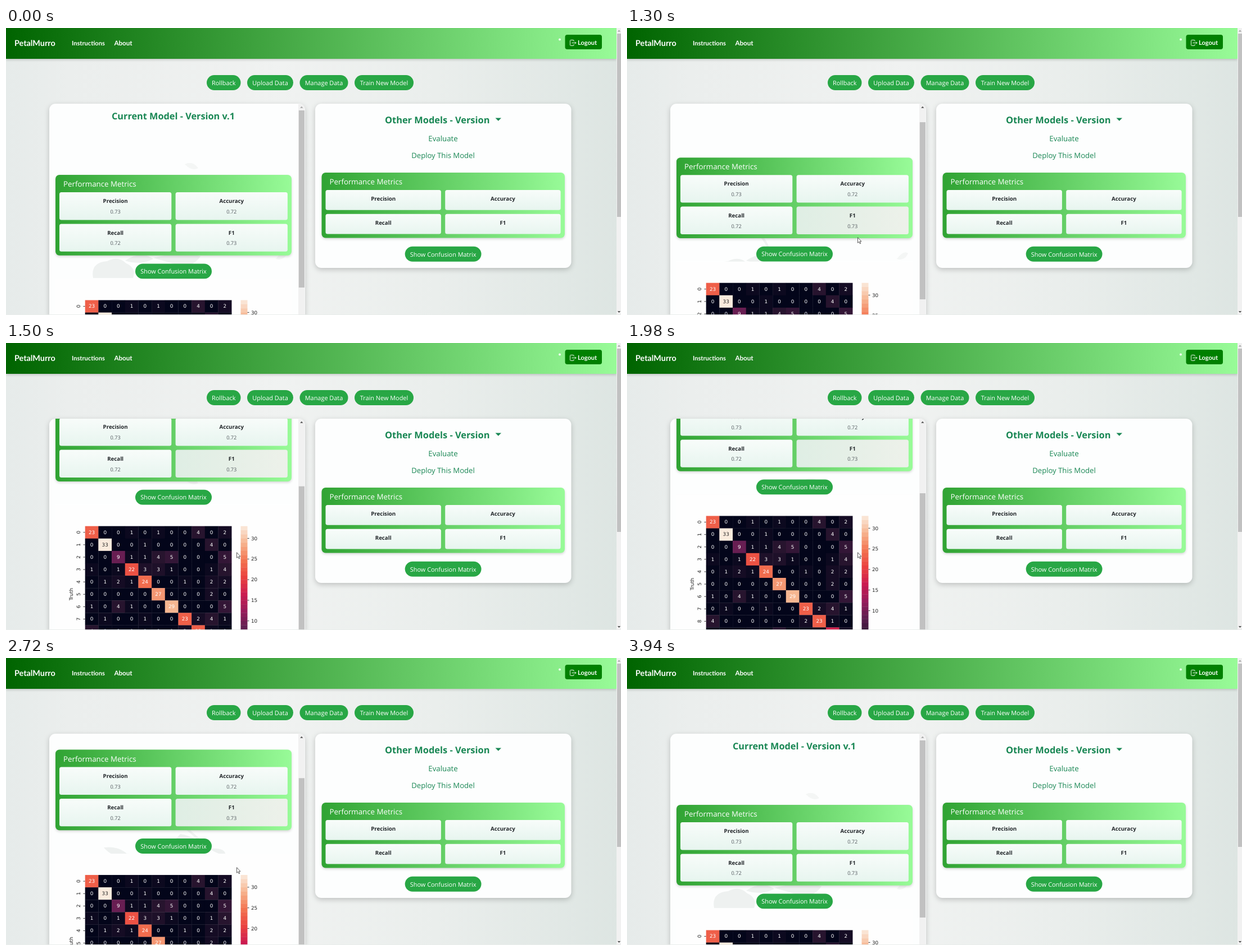
An HTML page for the animation above (4.94 s loop, 1094 px wide and 512 px high).

```html
<!DOCTYPE html>
<html lang="en">
<head>
<meta charset="utf-8">
<title>Model dashboard</title>
<style>
html, body { margin: 0; width: 100%; height: 100%; overflow: hidden; }
svg { display: block; width: 1094px; height: 512px; font-family: "Open Sans", "Noto Sans", sans-serif; text-rendering: geometricPrecision; }
.nav { font-family: Lato, sans-serif; font-weight: 700; fill: #fff; }
.plot { font-family: "DejaVu Sans", sans-serif; font-size: 8.8px; }
.card { filter: drop-shadow(0 3px 5px rgba(0,0,0,.2)); }
.panel { filter: drop-shadow(0 2px 2px rgba(0,0,0,.16)); }
</style>
</head>
<body>
<svg id="stage" viewBox="0 0 1094 512"></svg>
<script>
const LOOP = 4940, GREEN = '#198754';
const range = n => [...Array(n).keys()];

const rect = (x, y, w, h, fill, r = 0, extra = '') =>
  `<rect x="${x}" y="${y}" width="${w}" height="${h}" rx="${r}" fill="${fill}" ${extra}/>`;
const text = (s, x, y, size, fill, extra = 'text-anchor="middle"') =>
  `<text x="${x}" y="${y}" font-size="${size}" fill="${fill}" ${extra}>${s}</text>`;
const path = (d, fill, extra = '') => `<path d="${d}" fill="${fill}" ${extra}/>`;
const grad = (id, stops, dir = '') => `<linearGradient id="${id}" ${dir}>` +
  stops.map(([o, c]) => `<stop offset="${o}" stop-color="${c}"/>`).join('') + '</linearGradient>';
const down = 'x1="0" y1="0" x2="0" y2="1"';

const pill = (s, x, y, w) =>
  rect(x, y, w, 27, '#28a745', 13.5) + text(s, x + w / 2, y + 17.8, 10.9, '#fff');

function panel(x, y, w, cellW, cellH, values) {
  let out = rect(x, y, w, 45 + 2 * cellH, 'url(#panel)', 7, 'class="panel"') +
    text('Performance Metrics', x + 14, y + 21, 13.3, '#fff', '');
  ['Precision', 'Accuracy', 'Recall', 'F1'].forEach((name, i) => {
    const cx = x + 7 + (i % 2) * (cellW + 7.3);
    const cy = y + 31 + (i >> 1) * (cellH + 7);
    const id = values && i === 3 ? 'id="hot"' : '';
    out += rect(cx, cy, cellW, cellH, 'url(#cell)', 3.5, id) +
      text(name, cx + cellW / 2, cy + 19.2, 9.7, '#212529', 'text-anchor="middle" font-weight="700"');
    if (values) out += text(values[i], cx + cellW / 2, cy + 38, 9.2, '#555b60');
  });
  return out;
}

// Heat map
const ramp = [[3, 5, 26], [40, 20, 47], [94, 31, 80], [151, 28, 91], [203, 27, 79],
  [234, 65, 62], [243, 117, 81], [246, 180, 143], [250, 235, 221]];
function heat(v) {
  const p = v / 33 * 8, i = Math.min(7, Math.floor(p));
  return `rgb(${ramp[i].map((c, k) => Math.round(c + (ramp[i + 1][k] - c) * (p - i)))})`;
}
const rows = [
  '23 0 0 1 0 1 0 0 4 0 2',
  '0 33 0 0 1 0 0 0 0 4 0',
  '0 0 9 1 1 4 5 0 0 0 5',
  '1 0 1 22 3 3 1 0 0 1 4',
  '0 1 2 1 24 0 0 1 0 2 2',
  '0 0 0 0 0 27 0 0 0 2 0',
  '1 0 4 1 0 0 29 0 0 0 5',
  '0 1 0 0 1 0 0 23 2 4 1',
  '4 0 0 0 0 0 0 2 23 1 0',
  '0 0 0 1 0 4 0 0 0 17 2'
].map(r => r.split(' ').map(Number));

function matrix() {
  const x0 = 140.7, y0 = 485.5, w = 23.68, h = 22.1;
  const turned = (s, x, y) => text(s, 0, 0, 8.8, '#222',
    `text-anchor="middle" transform="translate(${x} ${y}) rotate(-90)"`);
  let out = rect(88, 447.5, 420, 330, '#fefefe');
  rows.forEach((row, r) => {
    const cy = y0 + (r + .5) * h;
    row.forEach((v, c) => {
      out += rect(x0 + c * w, y0 + r * h, w + .3, h + .3, heat(v)) +
        text(v, x0 + (c + .5) * w, cy + 2.8, 8.8, v > 29 ? '#262626' : '#fff');
    });
    out += rect(137.5, cy - .4, 3, .9, '#222') + turned(r, 132, cy);
  });
  out += turned('Truth', 118.5, 607);
  range(33).forEach(i => out += rect(417.5, y0 + i * 7.36, 12, 7.7, heat(33 - i - .5)));
  range(5).forEach(i => {
    const y = 507.3 + i * 36.8;
    out += rect(429.5, y - .4, 3, .9, '#222') + text(30 - i * 5, 436, y + 3.2, 8.8, '#222', '');
  });
  return `<g class="plot">${out}</g>`;
}

// Faint plant behind the left card's content
const plant =
  path('M155 446Q150 418 180 416Q200 406 214 420Q232 428 226 446ZM212 415Q240 396 262 412Q238 424 212 415Z' +
    'M262 410Q310 398 346 407Q330 432 296 420ZM150 366Q168 350 186 369ZM174 338Q204 334 222 356Q190 358 174 338Z' +
    'M296 330Q325 352 356 340Q338 318 310 314ZM362 340Q392 338 390 352Q376 350 362 340Z', '#eef1f0') +
  path('M318 243Q332 236 342 250Q330 256 318 243ZM480 412Q492 396 500 402Q494 416 480 412Z', '#f4f6f5') +
  path('M322 305Q345 325 365 343M215 350Q250 375 255 405', 'none', 'stroke="#f0f3f2" stroke-width="4"');

const arrow = (x, y, dir, fill, id = '') =>
  path(`M${x - 2.6} ${y + 1.5 * dir}h5.2l-2.6 ${-3 * dir}z`, fill, id);

document.getElementById('stage').innerHTML = `<defs>
  ${grad('page', [[0, '#e6ebea'], [.1, '#ebeeed'], [.45, '#f0f2f1'], [.7, '#eaeeec'], [1, '#dde5e2']])}
  ${grad('nav', [[0, '#006400'], [1, '#98fb98']])}
  ${grad('panel', [[0, '#30a333'], [1, '#98fb98']])}
  ${grad('cell', [[0, '#f8fcfa'], [1, '#e7f5ef']], down)}
  ${grad('hover', [[0, '#dfeee4'], [1, '#edf1ea']])}
  <clipPath id="view"><path d="M77 512V146Q77 135 88 135H520V512Z"/></clipPath>
</defs>` +
  rect(0, 0, 1094, 512, 'url(#page)') +
  // header
  rect(0, 0, 1086, 55, 'url(#nav)', 0, 'class="panel"') +
  `<g class="nav">` +
  text('PetalMurro', 15, 31.5, 14.4, '#fff', '') +
  text('Instructions', 117, 31, 11.1, '#fff', '') +
  text('About', 192.5, 31, 11.6, '#fff', '') +
  rect(994.5, 12, 65.5, 26, '#008000', 4) +
  text('Logout', 1017, 29.6, 11, '#fff', '') + '</g>' +
  path('M1010 24V22.5Q1010 21.5 1009 21.5H1004.5Q1003.5 21.5 1003.5 22.5V30.5Q1003.5 31.5 1004.5 31.5H1009Q1010 31.5 1010 30.5V29M1006.5 26.5H1014M1012 24.5L1014 26.5L1012 28.5',
    'none', 'stroke="#fff" stroke-width=".9"') +
  '<circle cx="985" cy="20.5" r="2" fill="#f2fff2"/>' +
  // page scrollbar
  rect(1086, 0, 8, 512, '#f1f1f1') + rect(1087, 10, 7, 327, '#c1c1c1') +
  arrow(1090.5, 5, 1, '#a3a3a3') + arrow(1090.5, 506.5, -1, '#505050') +
  // actions
  pill('Rollback', 357, 84, 60.5) + pill('Upload Data', 429, 84, 82) +
  pill('Manage Data', 522.5, 84, 86) + pill('Train New Model', 620, 84, 105) +
  // left card
  rect(77, 135, 455, 420, '#fdfefe', 11, 'class="card"') +
  `<g clip-path="url(#view)">${plant}<g id="content">` +
  text('Current Model - Version v.1', 297.5, 163, 16.3, GREEN, 'text-anchor="middle" font-weight="700"') +
  panel(88, 262, 420, 199.3, 49.4, ['0.73', '0.72', '0.72', '0.73']) +
  pill('Show Confusion Matrix', 230, 420.5, 136) + matrix() + '</g></g>' +
  path('M520 135.5Q531.5 135 531.5 146V512H520Z', '#f1f1f1') +
  rect(520.8, 147, 10.2, 316, '#c1c1c1', 0, 'id="thumb"') +
  arrow(525.8, 141.2, 1, '#a3a3a3', 'id="up"') +
  // right card
  rect(550, 135, 455.5, 293, '#fdfefe', 11, 'class="card"') +
  text('Other Models - Version', 674, 170, 16.4, GREEN, 'font-weight="700"') +
  path('M870.5 160.5h10.5l-5.25 5.3z', GREEN) +
  text('Evaluate', 777.5, 201.8, 13.3, GREEN) +
  text('Deploy This Model', 777.5, 231.5, 13.1, GREEN) +
  panel(561.5, 258, 432.5, 205.4, 35.8) +
  pill('Show Confusion Matrix', 709.7, 389.8, 135.8) +
  rect(0, 511, 1094, 1, '#e9edeb') +
  path('M0 0V9.6L2.2 7.6L3.8 11.2L5.3 10.5L3.7 7.1H6.5Z', '#fff', 'id="cursor" stroke="#333" stroke-width=".8"');

const [content, hot, thumb, up, cursor] =
  ['content', 'hot', 'thumb', 'up', 'cursor'].map(id => document.getElementById(id));
const clamp = p => Math.max(0, Math.min(1, p));
const smooth = p => p * p * (3 - 2 * p);
const easeOut = p => 1 - (1 - p) ** 2;
const mix = (a, b, p) => a + (b - a) * p;

function scrollAt(t) {
  if (t < 1300) return 0;
  if (t < 2620) return 177 * easeOut(clamp((t - 1270) / 340));
  return 177 * (1 - smooth(clamp((t - 2610) / 240)));
}

function cursorAt(t) {
  if (t < 430 || t >= 3940) return null;
  if (t < 3590) {
    const p = smooth(clamp((t - 410) / 370));
    return [mix(938, 410.5, p), mix(459, 373.7, p)];
  }
  const p = smooth(clamp((t - 3560) / 380));
  return [mix(410.5, 1062, p), mix(373.7, 508, p)];
}

function draw(now) {
  const t = now % LOOP, s = scrollAt(t), pos = cursorAt(t);
  content.setAttribute('transform', `translate(0 ${-s})`);
  thumb.setAttribute('y', 147 + s * .684);
  up.setAttribute('fill', s > 0 ? '#505050' : '#a3a3a3');
  cursor.setAttribute('visibility', pos ? 'visible' : 'hidden');
  if (pos) cursor.setAttribute('transform', `translate(${pos})`);
  hot.setAttribute('fill', pos && pos[0] < 501 && pos[1] < 399 ? 'url(#hover)' : 'url(#cell)');
  requestAnimationFrame(draw);
}
requestAnimationFrame(draw);
</script>
</body>
</html>
```
